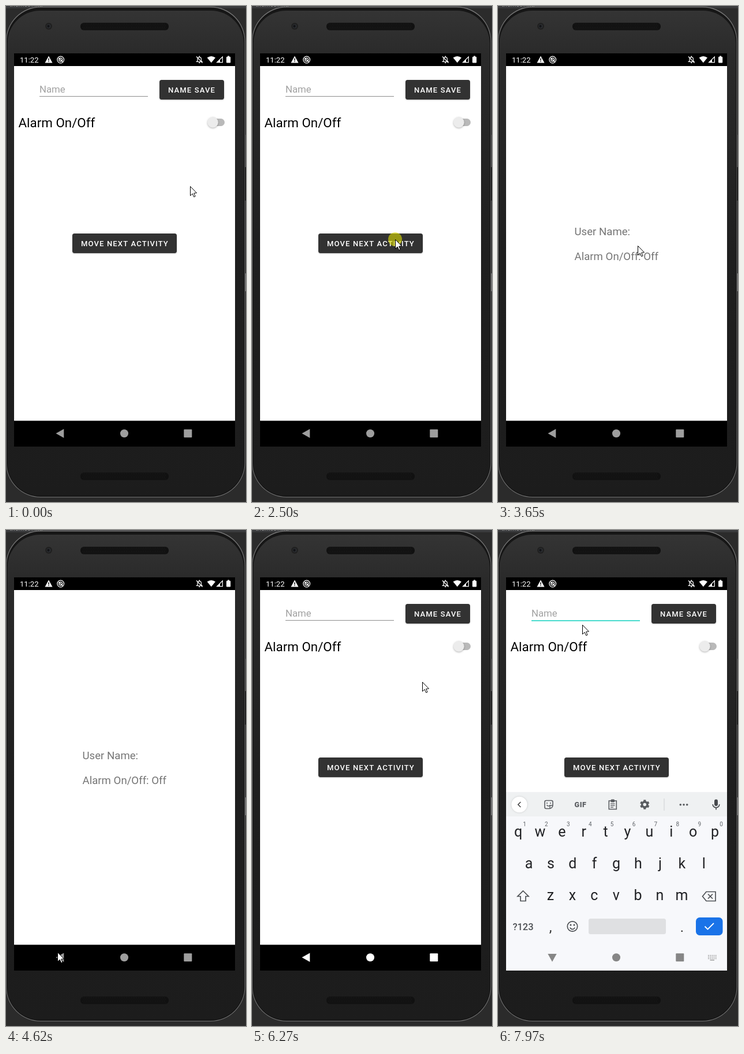
Animation, 416 px wide and 859 px high, one loop 8000 ms. Source, as an HTML page with a canvas:

```html
<!DOCTYPE html>
<html lang="en">
<head>
<meta charset="utf-8">
<title>Phone demo</title>
<style>
html, body { margin: 0; width: 100%; height: 100%; overflow: hidden; background: #2b2c2d; }
canvas { display: block; width: 100vw; height: 100vh; }
</style>
</head>
<body>
<canvas id="stage"></canvas>
<script>
const W = 416, H = 859, LOOP = 8000;
const CX = 205.5, CY = 422.5;
const SCREEN = [14, 82, 383, 681];
const CONTENT = [14, 104, 383, 614.3];
const canvas = document.getElementById('stage');
const c = canvas.getContext('2d');
const ratio = window.devicePixelRatio || 1;
canvas.width = W * ratio;
canvas.height = H * ratio;

// Bursts of activity: start, end, number of visible steps
const BURSTS = [
  [1430, 2120, 11], [2500, 3190, 11], [3650, 4140, 8], [4340, 4620, 5],
  [4950, 5710, 12], [5780, 6270, 8], [6730, 7280, 8], [7420, 7970, 8]
];
// Pointer path: time, x, y
const PATH = [
  [0, 319, 312], [1360, 319, 312], [2120, 248, 404], [3580, 248, 404],
  [4140, 98, 663], [4270, 98, 663], [4620, 89, 731], [5226, 89, 731],
  [5295, 99, 704], [5710, 212, 343], [6270, 295, 263], [6660, 295, 263],
  [7123, 146, 164], [8000, 146, 164]
];
// Clicks: start, end
const CLICKS = [[2500, 2640], [4950, 5090], [7123, 7275]];
// Page changes: start, duration
const OPEN = [2815, 370], CLOSE = [5157, 400];

const clamp = v => Math.max(0, Math.min(1, v));
const mix = (a, b, p) => a + (b - a) * p;
const smooth = p => p * p * (3 - 2 * p);

// The picture only updates on the steps of each burst
function sample(t) {
  let s = 0;
  for (const [a, b, n] of BURSTS) {
    if (t < a) break;
    const dt = (b - a) / (n - 1);
    s = t >= b ? b : a + Math.floor((t - a + 6) / dt) * dt;
  }
  return s;
}

function bezier(a, b, d, e, u) {
  const v = 1 - u;
  return v * v * v * a + 3 * v * v * u * b + 3 * v * u * u * d + u * u * u * e;
}

// Quick start with a very long settling tail
function settle(p) {
  if (p <= 0 || p >= 1) return clamp(p);
  const xs = p < 1 / 6 ? [0, .05, .1333, 1 / 6] : [1 / 6, .2083, .25, 1];
  const ys = p < 1 / 6 ? [0, 0, .06, .4] : [.4, .82, 1, 1];
  let lo = 0, hi = 1;
  for (let i = 0; i < 24; i++) {
    const m = (lo + hi) / 2;
    if (bezier(...xs, m) < p) lo = m; else hi = m;
  }
  return bezier(...ys, lo);
}

function rect(x, y, w, h, color) {
  c.fillStyle = color;
  c.fillRect(x, y, w, h);
}
function round(x, y, w, h, r, color) {
  c.beginPath();
  c.roundRect(x, y, w, h, r);
  c.fillStyle = color;
  c.fill();
}
function disc(x, y, r, color) {
  c.beginPath();
  c.arc(x, y, r, 0, 7);
  c.fillStyle = color;
  c.fill();
}
function ring(x, y, r, color, width, from = 0, to = 7) {
  c.beginPath();
  c.arc(x, y, r, from, to);
  c.strokeStyle = color;
  c.lineWidth = width;
  c.stroke();
}
function trace(pts) {
  c.beginPath();
  for (let i = 0; i < pts.length; i += 2) c.lineTo(pts[i], pts[i + 1]);
}
function poly(pts, color) {
  trace(pts);
  c.closePath();
  c.fillStyle = color;
  c.fill();
}
function line(pts, color, width, closed) {
  trace(pts);
  if (closed) c.closePath();
  c.strokeStyle = color;
  c.lineWidth = width;
  c.stroke();
}
function text(s, x, y, size, color, { weight = 400, align = 'left', spacing = 0 } = {}) {
  c.font = `${weight} ${size}px Roboto, sans-serif`;
  c.letterSpacing = spacing + 'px';
  c.textAlign = align;
  c.fillStyle = color;
  c.fillText(s, x, y);
}
function shadow(alpha, blur, dy) {
  c.shadowColor = `rgba(0,0,0,${alpha})`;
  c.shadowBlur = blur;
  c.shadowOffsetY = dy;
}
function clipScreen() {
  c.beginPath();
  c.rect(...SCREEN);
  c.clip();
}

function speaker(y) {
  round(129, y, 153, 13, 6, '#111');
  for (let i = 0; i < 48; i++)
    for (let j = 0; j < 4; j++)
      rect(133 + i * 3 + (j % 2) * 1.5, y + 1.5 + j * 3, 1, 1, '#222');
}

function phone() {
  rect(0, 0, W, H, '#2b2b2b');
  rect(0, 0, W, 4, '#3a3b3d');
  text('themes.xml', 6, 1, 11, '#9a9a9a');
  const body = c.createLinearGradient(0, 0, 0, H);
  body.addColorStop(0, '#353535');
  body.addColorStop(.1, '#2a2a2a');
  body.addColorStop(.5, '#1f1f1f');
  body.addColorStop(1, '#1c1c1c');
  round(0, 1, 414.5, 850, 60, '#747474');
  round(1, 2.5, 412.5, 847.5, 59, '#161616');
  round(2.5, 8, 409.5, 840, 57, body);
  rect(413.5, 223, 2.5, 56, '#4a4a4a');
  rect(414.5, 279, 1.5, 58, '#0c0c0c');
  rect(414.5, 463, 1.5, 31, '#777');
  disc(74, 35, 6, '#202020');
  disc(74, 35, 3.6, '#2b2e32');
  disc(73.5, 35, 2.2, '#131416');
  speaker(29);
  speaker(808);
}

function button(label, x, y, w, ripple) {
  c.save();
  shadow(.25, 2, 1);
  round(x, y, w, 34, 3.7, '#323232');
  c.restore();
  if (ripple) {
    c.save();
    c.beginPath();
    c.roundRect(x, y, w, 34, 3.7);
    c.clip();
    disc(248, 404, 20 + 150 * ripple, `rgba(255,255,255,${.2 * (1 - ripple * .6)})`);
    c.restore();
  }
  text(label, x + 15, y + 22, 13.05, '#fff', { weight: 500, spacing: 1.11 });
}

function mainPage(t) {
  const focused = t >= 7200;
  text('Name', 58, 150, 16.8, '#a2a2a2');
  if (focused) rect(58, 156.3, 188, 1.6, '#1fd3c2');
  else rect(58, 156, 188, 1, '#8c8c8c');
  if (t >= 7280 && t < 7770) rect(58, 133, 2, 20, '#03dac5');
  button('NAME SAVE', 266, 128, 112, 0);
  text('Alarm On/Off', 21.5, 210, 22.37, '#000');
  round(351, 195, 28, 13, 6.5, '#b9b9b9');
  c.save();
  shadow(.3, 3, 1);
  disc(358.5, 201.5, 9.3, '#ececec');
  c.restore();
  const p = (t - 2560) / 300;
  button('MOVE NEXT ACTIVITY', 115, 394, 181, p > 0 && p < 1 ? p : 0);
}

function nextPage() {
  text('User Name:', 132.5, 396.5, 18.64, '#757575');
  text('Alarm On/Off: Off', 132.5, 440, 18.64, '#757575');
}

function page(draw, t, scale = 1, alpha = 1, dim = 0) {
  c.save();
  clipScreen();
  c.globalAlpha = alpha;
  c.translate(CX, CY);
  c.scale(scale, scale);
  c.translate(-CX, -CY);
  rect(...SCREEN, '#000');
  rect(...CONTENT, '#fff');
  draw(t);
  if (dim) rect(...CONTENT, `rgba(0,0,0,${dim})`);
  c.restore();
}

function pages(t) {
  const open = (t - OPEN[0]) / OPEN[1], close = (t - CLOSE[0]) / CLOSE[1];
  if (open <= 0 || close >= 1) page(mainPage, t);
  else if (open < 1) {
    const p = settle(open);
    page(mainPage, t, mix(1, 1.05, p), 1, .075 * p);
    page(nextPage, t, mix(.85, 1, p), clamp((t - OPEN[0] - 35) / 50));
  } else if (close <= 0) page(nextPage, t);
  else {
    const p = settle(close);
    page(mainPage, t, mix(1.1, 1, p));
    const alpha = 1 - clamp((t - CLOSE[0] - 35) / 50);
    if (alpha) page(nextPage, t, mix(1, .9, p), alpha);
  }
}

function statusBar() {
  const w = '#fff';
  text('11:22', 24, 98, 13.05, w);
  poly([74, 86.5, 80.5, 98.5, 67.5, 98.5], w);
  rect(73.3, 90.5, 1.4, 4, '#000');
  rect(73.3, 95.5, 1.4, 1.4, '#000');
  ring(94.7, 93, 5.8, w, 1.3);
  ring(94.7, 93, 2.9, w, 1.3);
  line([91.5, 90, 98.5, 97], w, 1.4);
  // muted bell
  c.beginPath();
  c.moveTo(330.5, 96.5);
  c.lineTo(332, 95);
  c.lineTo(332, 92);
  c.bezierCurveTo(332, 87.5, 338.4, 87.5, 338.4, 92);
  c.lineTo(338.4, 95);
  c.lineTo(339.8, 96.5);
  c.closePath();
  c.strokeStyle = w;
  c.lineWidth = 1.2;
  c.stroke();
  rect(334, 97.5, 2.5, 1.5, w);
  rect(334.5, 86.5, 1.5, 2, w);
  line([330, 87.5, 340.5, 98.5], w, 1.2);
  // wifi
  c.beginPath();
  c.moveTo(355.8, 98.3);
  c.lineTo(348.6, 89.5);
  c.quadraticCurveTo(355.8, 84.5, 363, 89.5);
  c.closePath();
  c.fillStyle = w;
  c.fill();
  // signal
  line([375.3, 88, 375.3, 97.6, 365.6, 97.6], w, 1.2, true);
  poly([371, 92, 371, 98, 365, 98], w);
  round(382, 88, 7.2, 10.5, 1, w);
  rect(384, 86.5, 3.2, 2, w);
}

function navBar(t, kb) {
  const pill = clamp((t - 4960) / 60) * (1 - clamp((t - 5330) / 240));
  if (pill) {
    c.save();
    c.beginPath();
    c.rect(14, 722, 383, 41);
    c.clip();
    round(45, 720.5, 99, 42, 21, `rgba(255,255,255,${.115 * pill})`);
    c.restore();
  }
  const color = kb > 0 ? '#868686' : t >= 5010 ? '#fff' : '#9e9e9e';
  c.save();
  c.translate(94, 740.2);
  c.rotate(-Math.PI / 2 * kb);
  poly([-7.5, 0, 6.3, -7.7, 6.3, 7.7], color);
  c.restore();
  disc(205, 740.2, 7, color);
  round(308.3, 733.2, 14, 14, 1, color);
  if (kb > 0) {
    c.globalAlpha = kb;
    for (let i = 0; i < 5; i++)
      for (let j = 0; j < 3; j++) rect(364 + i * 3.2, 736 + j * 2.8, 1.7, 1.5, '#9a9a9a');
    rect(367.5, 744.2, 7.5, 1.4, '#9a9a9a');
    c.globalAlpha = 1;
  }
}

function toolbar() {
  const g = '#5a5d61';
  rect(14, 454, 383, 42, '#eff1f2');
  c.save();
  shadow(.18, 3, 0);
  disc(37, 475.5, 13.7, '#fff');
  c.restore();
  line([39.3, 471, 34.8, 475.5, 39.3, 480], '#444', 1.6);
  // sticker
  c.beginPath();
  c.roundRect(81, 468.5, 14, 14, [2.5, 2.5, 6, 2.5]);
  c.strokeStyle = g;
  c.lineWidth = 1.6;
  c.stroke();
  line([95, 477, 90, 477, 90, 482], g, 1.4);
  disc(85, 473, 1.1, g);
  disc(91, 473, 1.1, g);
  ring(87.5, 475, 3, g, 1.4, .5, 2.8);
  text('GIF', 143, 480, 12.5, g, { weight: 900, align: 'center', spacing: .6 });
  // clipboard
  c.strokeStyle = g;
  c.lineWidth = 1.6;
  c.strokeRect(192.3, 469, 13, 14.5);
  round(195.5, 466.5, 6.6, 5, 1.5, g);
  for (let i = 0; i < 3; i++) rect(195, 473.5 + i * 3, i < 2 ? 7.5 : 5, 1.3, g);
  // gear
  ring(254.3, 475.5, 4.6, g, 3.6);
  for (let i = 0; i < 6; i++) {
    c.save();
    c.translate(254.3, 475.5);
    c.rotate(i * Math.PI / 3);
    rect(-2, -8.2, 4, 3, g);
    c.restore();
  }
  rect(287.5, 465, 1, 21, '#cdd0d2');
  for (let i = -1; i < 2; i++) disc(322 + i * 5.7, 475.7, 1.8, g);
  // microphone
  const m = '#46494d';
  round(375, 466.5, 6, 11.5, 3, m);
  ring(378, 475, 5.8, m, 1.6, 0, Math.PI);
  rect(377.2, 480.5, 1.6, 4, m);
}

function keys(row, x, y, size = 25, color = '#202124') {
  [...row].forEach((k, i) => text(k, x + i * 37.9, y, size, color, { align: 'center' }));
}

function keyboard(kb) {
  const g = '#4d5054';
  c.save();
  clipScreen();
  c.globalAlpha = kb;
  c.translate(0, 62 * (1 - kb));
  rect(14, 453.5, 383, 372, '#f7f8fb');
  toolbar();
  keys('qwertyuiop', 35, 531);
  keys('1234567890', 46, 513, 10, '#5f6368');
  keys('asdfghjkl', 53.5, 586);
  keys('zxcvbnm', 91, 641);
  line([43.5, 625, 53, 634.5, 48, 634.5, 48, 642.5, 39, 642.5, 39, 634.5, 34, 634.5], g, 1.7, true);
  line([354.5, 634.5, 361, 626.5, 377, 626.5, 377, 642.5, 361, 642.5], g, 1.7, true);
  line([364, 630.5, 372, 638.5], g, 1.7);
  line([372, 630.5, 364, 638.5], g, 1.7);
  text('?123', 43.5, 693, 16.5, g, { weight: 500, align: 'center' });
  text(',', 91, 696, 24, '#333', { align: 'center' });
  text('.', 319, 696, 24, '#333', { align: 'center' });
  // smiley
  ring(129, 686.5, 8.7, g, 1.7);
  disc(126, 684, 1.5, g);
  disc(132, 684, 1.5, g);
  ring(129, 687, 4.4, g, 1.7, .35, Math.PI - .35);
  round(157, 673, 134, 27, 3.5, '#dfe0e2');
  round(343, 671, 46.5, 31, 6.5, '#1a73e8');
  line([358.5, 686.5, 363.5, 691.5, 374, 681], '#fff', 1.8);
  c.restore();
}

function pointer(t) {
  let i = 1;
  while (i < PATH.length - 1 && t > PATH[i][0]) i++;
  const [t0, x0, y0] = PATH[i - 1], [t1, x1, y1] = PATH[i];
  const p = smooth(clamp((t - t0) / (t1 - t0)));
  const x = mix(x0, x1, p), y = mix(y0, y1, p);
  if (CLICKS.some(([a, b]) => t >= a && t < b)) disc(x, y, 12, 'rgba(222,222,0,.6)');
  c.save();
  c.translate(Math.round(x) + .5, Math.round(y) + .5);
  const arrow = [0, 0, 0, 16, 3.7, 12.6, 6.2, 18.2, 8.6, 17.2, 6.2, 11.7, 11, 11.3];
  poly(arrow, '#fff');
  line(arrow, '#000', 1, true);
  c.restore();
}

function draw(now) {
  const t = sample(now % LOOP);
  const kb = t < 7420 ? 0 : 1 - Math.pow(1 - clamp((t - 7400) / 280), 3);
  c.setTransform(ratio, 0, 0, ratio, 0, 0);
  phone();
  pages(t);
  statusBar();
  if (kb) keyboard(kb);
  navBar(t, kb);
  pointer(t);
}

const start = performance.now();
function tick() {
  draw(performance.now() - start);
  requestAnimationFrame(tick);
}
tick();
</script>
</body>
</html>
```
